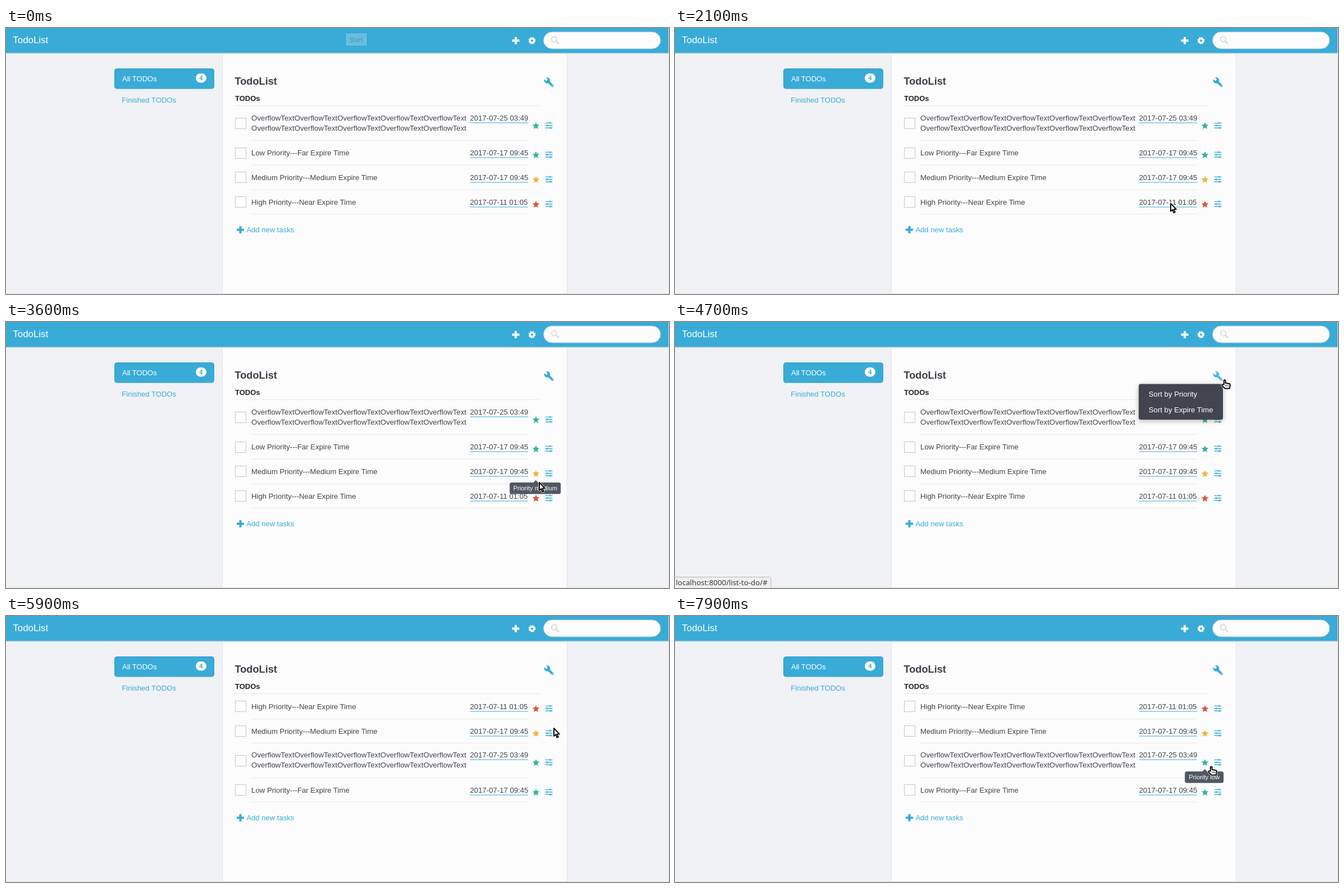
An HTML page for the animation above (8 s loop, 1181 by 474 pixels).

```html
<!DOCTYPE html>
<html lang="en">
<head>
<meta charset="utf-8">
<title>TodoList</title>
<style>
  html, body { margin: 0; width: 100%; height: 100%; overflow: hidden; background: #f0f2f6; }
  svg { display: block; width: 1181px; height: 474px; font: 13.17px "Liberation Sans", Arial, sans-serif; }
  .blue { fill: #39abd7; }
  .blueLine { stroke: #39abd7; fill: none; }
  .rule { stroke: #e7e8ea; }
  .task { fill: #40454e; }
  .light { fill: #fff; }
  .menu { filter: drop-shadow(0 2px 4px rgb(0 0 0 / .3)); }
</style>
</head>
<body>
<svg viewBox="0 0 1181 474">
  <rect width="1181" height="474" fill="#f0f2f6"/>
  <path d="M385.5 44H999.5V474H385.5Z" fill="#fcfcfc" stroke="#e3e5e9"/>
  <rect y="44" width="1181" height="2" fill="#d5dde3"/>
  <rect class="blue" width="1180" height="44.5"/>
  <path d="M0 473.5H1180.5V0" fill="none" stroke="#dfe1e4"/>

  <text class="light" x="12.3" y="27" font-size="16.9">TodoList</text>
  <path d="M901.5 22.5H914.5M908 16V29" stroke="#fff" stroke-width="3.9"/>
  <g fill="none" stroke="#fff">
    <circle cx="937" cy="22.5" r="3.6" stroke-width="3.2"/>
    <circle cx="937" cy="22.5" r="5.3" stroke-width="2.2" stroke-dasharray="2.3 1.863"/>
  </g>
  <rect x="957.5" y="7" width="208.5" height="30" rx="15" fill="#fcfcfc" stroke="#b4c9d3"/>
  <g fill="none" stroke="#dedfe1" stroke-width="2.2">
    <circle cx="976.5" cy="20" r="4.7"/><path d="M980 23.5L985 28.5" stroke-width="3"/>
  </g>

  <rect x="193.5" y="72.5" width="177" height="35.5" rx="4" fill="#39abd7" stroke="#369fca"/>
  <text class="light" x="207" y="95" font-size="13">All TODOs</text>
  <rect x="338" y="81" width="19" height="16.5" rx="8.2" fill="#fff"/>
  <text class="blue" x="347.5" y="93.3" font-size="11.3" font-weight="700" text-anchor="middle">4</text>
  <text class="blue" x="206.3" y="133" font-size="13.05">Finished TODOs</text>

  <text x="407.5" y="101" font-size="18.2" font-weight="700" fill="#3d4047">TodoList</text>
  <text x="408" y="129.5" font-size="13" font-weight="700" fill="#222428">TODOs</text>
  <path class="rule" d="M408 138.5H950"/>
  <g id="wrench">
    <path d="M965.5 95L973.5 103" stroke="currentColor" stroke-width="4.2" stroke-linecap="round"/>
    <path d="M959 91.3L962.3 94.5L965.3 91.7L962 88.4A5.4 5.4 0 1 1 959 91.3Z" fill="currentColor"/>
    <circle cx="973.3" cy="102.8" r=".9" fill="#fcfcfc"/>
  </g>
  <path class="blueLine" d="M411 359.5H424M417.5 353V366" stroke-width="3.9"/>
  <text class="blue" x="428.4" y="364" font-size="13.05">Add new tasks</text>
  <g id="live"></g>
</svg>
<script>
const LOOP = 8000, STEP = 100;
const LONG = "OverflowText".repeat(5);
const COLORS = { low: "#35b79b", medium: "#f3b53d", high: "#e1563d" };

const TASKS = {
  long: { lines: [LONG, LONG], date: "2017-07-25 03:49", level: "low" },
  far: { lines: ["Low Priority---Far Expire Time"], date: "2017-07-17 09:45", level: "low" },
  mid: { lines: ["Medium Priority---Medium Expire Time"], date: "2017-07-17 09:45", level: "medium" },
  near: { lines: ["High Priority---Near Expire Time"], date: "2017-07-11 01:05", level: "high" }
};
const UNSORTED = ["long", "far", "mid", "near"];
const SORTED = ["near", "mid", "long", "far"];
const SORT_AT = 5400;

// [shown from, fading at, task]
const TOOLTIPS = [
  [2500, 2800, "far"], [3300, 3700, "mid"], [3900, 4200, "near"],
  [6300, 6600, "near"], [6800, 7500, "mid"], [7600, 8000, "long"]
];
const TIP_WIDTH = { low: 69, medium: 91, high: 74 };

// [time, x, y, shape used from here on]
const POINTER = [
  [100, 738, 413, "arrow"], [600, 590, 320, "arrow"], [800, 515, 268, "beam"],
  [900, 504, 256, "beam"], [1000, 490, 240, "beam"], [1100, 483, 233, "beam"],
  [1200, 474, 225, "beam"], [1300, 486, 236, "beam"], [1400, 486, 236, "beam"],
  [1700, 610, 270, "arrow"], [2200, 950, 322, "arrow"], [2300, 950, 300, "arrow"],
  [2400, 947, 226, "hand"], [2700, 949, 226, "hand"], [2800, 957, 228, "hand"],
  [3000, 968, 236, "arrow"], [3200, 946, 268, "hand"], [3500, 946, 272, "hand"],
  [3600, 949, 285, "arrow"], [3800, 945, 313, "hand"], [4000, 947, 316, "hand"],
  [4100, 975, 136, "arrow"], [4300, 985, 97, "arrow"], [4500, 979, 103, "hand"],
  [4900, 979, 103, "hand"], [5200, 925, 127, "hand"], [5500, 925, 127, "hand"],
  [5600, 940, 150, "arrow"], [5900, 975, 199, "arrow"], [6100, 1000, 190, "arrow"],
  [6300, 947, 171, "hand"], [6500, 947, 171, "hand"], [6800, 949, 222, "hand"],
  [6900, 950, 231, "hand"], [7000, 950, 213, "hand"], [7300, 950, 213, "hand"],
  [7600, 952, 262, "hand"], [7900, 955, 268, "hand"]
];

const outlined = (d, fill) =>
  `<path d="${d}" fill="none" stroke="#fff" stroke-width="3.4" stroke-linejoin="round"/>` +
  `<path d="${d}" fill="${fill}" stroke="#000" stroke-width="1.9" stroke-linejoin="round"/>`;
const SHAPES = {
  arrow: outlined("M1 1V15L4.3 12.2L6.4 17.6L8.8 16.6L6.6 11.4H10.8Z", "#fff"),
  hand: outlined("M-1.2 8.5V1.2Q0 -.6 1.6 1.2V5.8L8.6 7Q10.2 7.6 10 9.6L8.8 15.5H.8L-4.6 10.2Q-5 7.6 -2.8 8.2Z", "#fff") +
    '<path d="M2 12V9M4.5 12V9M7 12V9.3" stroke="#000" stroke-width=".9"/>',
  beam: outlined("M-3.2 -7H-1L0 -6L1 -7H3.2M0 -6V6M-3.2 7H-1L0 6L1 7H3.2", "none")
};

const text = (x, y, value, attrs = "") => `<text x="${x}" y="${y}" ${attrs}>${value}</text>`;

function star(cy, color) {
  const points = Array.from({ length: 10 }, (_, i) => {
    const r = i % 2 ? 3.2 : 6.6, a = (i / 5 - 0.5) * Math.PI;
    return `${(944 + r * Math.cos(a)).toFixed(2)},${(cy + 0.6 + r * Math.sin(a)).toFixed(2)}`;
  });
  return `<polygon points="${points.join(" ")}" fill="${color}"/>`;
}

function sliders(cy) {
  const knobs = [[969, -4.3], [964, 0], [970, 4.3]];
  const lines = knobs.map(([x, dy]) => `M960.5 ${cy + dy}H973.5M${x} ${cy + dy - 1.9}v3.8`);
  return `<path class="blueLine" stroke-width="1.4" d="${lines.join("")}"/>`;
}

function layout(order) {
  let top = 139.3;
  return order.map(id => {
    const task = TASKS[id], tall = task.lines.length > 1;
    const row = {
      id, task,
      base: Math.round(top + (tall ? 25.7 : 26.6)),
      box: Math.round(top + (tall ? 31 : 22)),
      star: Math.round(top + (tall ? 34.2 : 25.6))
    };
    top += tall ? 61.4 : 43.7;
    row.end = Math.floor(top) + 0.5;
    return row;
  });
}

function drawRow({ task, base, box, star: cy, end }) {
  const size = task.lines.length > 1 ? 'font-size="13.25"' : "";
  return `<rect x="408.5" y="${box - 9.5}" width="19" height="19" fill="#fdfdfd" stroke="#c5c7c9"/>` +
    `<g class="task">${task.lines.map((line, i) => text(437.1, base + i * 18.3, line, size)).join("")}` +
    `${text(826.5, base, task.date)}</g>` +
    `<path class="blueLine" d="M826.5 ${base + 4}H930"/>` +
    `<path class="rule" d="M437 ${end}H930"/>` + star(cy, COLORS[task.level]) + sliders(cy - 0.3);
}

function drawTooltip({ task, star: cy }, opacity) {
  const w = TIP_WIDTH[task.level], x = 942.7 - w / 2;
  return `<g opacity="${opacity}"><rect x="${x}" y="${cy + 16}" width="${w}" height="20.5" rx="3.5" fill="#48505c"/>` +
    `<path d="M939 ${cy + 16.5}L943.7 ${cy + 11.8}L948.4 ${cy + 16.5}Z" fill="#48505c"/>` +
    text(942.7, cy + 30.2, "Priority " + task.level, 'font-size="11.28" fill="#fff" text-anchor="middle"') + "</g>";
}

const drawMenu = () =>
  '<rect class="menu" x="826" y="110.5" width="150" height="63.5" rx="3.5" fill="#42454f"/>' +
  `<g fill="#fff">${text(843.8, 133, "Sort by Priority")}${text(843.8, 160.5, "Sort by Expire Time")}</g>`;

const drawStatus = () =>
  '<path d="M-1 454.5H167.5Q171 454.5 171 458V475H-1Z" fill="#f0efed" stroke="#b9b7b4"/>' +
  text(1.5, 468.5, "localhost:8000/list-to-do/#", 'font-family="Open Sans, sans-serif" font-size="13.3" font-weight="500" fill="#303030"');

const drawStart = () =>
  '<rect x="606.5" y="10.5" width="35" height="20" fill="#69bddf" stroke="#85c5de"/>' +
  text(623.7, 25, "Start", 'font-family="Lato, sans-serif" font-size="11.5" fill="#4a93b3" text-anchor="middle"');

function drawPointer(t) {
  const i = POINTER.findLastIndex(key => key[0] <= t);
  if (i < 0) return "";
  const [t0, x0, y0, shape] = POINTER[i];
  const [t1, x1, y1] = POINTER[i + 1] || [LOOP, x0, y0];
  const k = (t - t0) / (t1 - t0);
  return `<g transform="translate(${x0 + (x1 - x0) * k} ${y0 + (y1 - y0) * k})">${SHAPES[shape]}</g>`;
}

const within = (t, from, to) => t >= from && t < to;
const live = document.getElementById("live");
const wrench = document.getElementById("wrench");

function render(t) {
  const rows = layout(t < SORT_AT ? UNSORTED : SORTED);
  let out = rows.map(drawRow).join("");
  for (const [from, fade, id] of TOOLTIPS) {
    if (within(t, from, fade + STEP))
      out += drawTooltip(rows.find(row => row.id === id), t === from || t === fade ? 0.64 : 0.95);
  }
  if (within(t, 4700, SORT_AT)) out += drawMenu();
  if (within(t, 2600, 3100) || within(t, 4700, 5700)) out += drawStatus();
  if (t < 100) out += drawStart();
  live.innerHTML = out + drawPointer(t);
  wrench.setAttribute("color", within(t, 4500, 5000) ? "#52bce2" : "#39abd7");
}

let shown = -1;
const began = performance.now();
function tick() {
  const t = Math.floor(((performance.now() - began) % LOOP) / STEP) * STEP;
  if (t !== shown) render(shown = t);
  requestAnimationFrame(tick);
}
tick();
</script>
</body>
</html>
```
